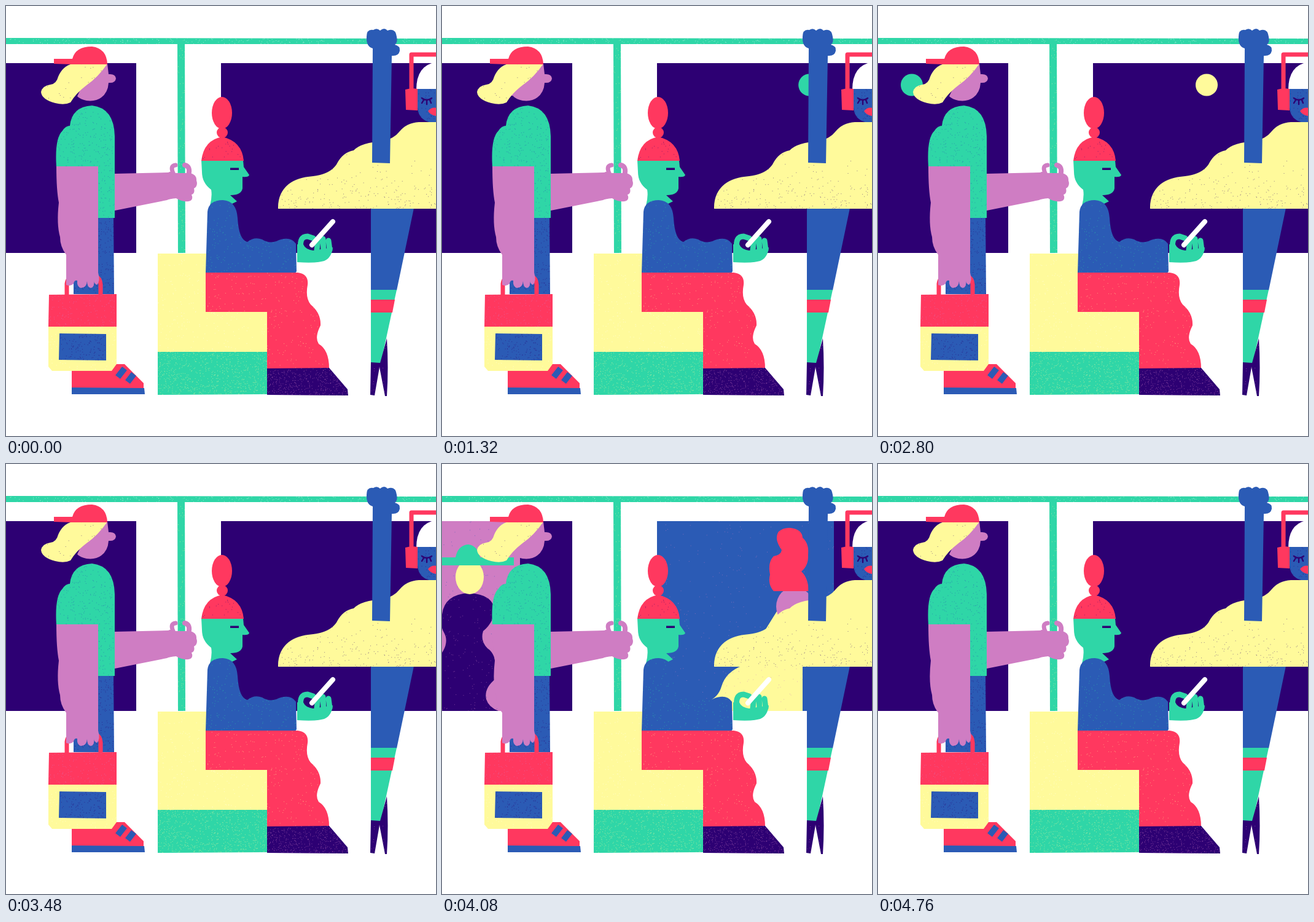
Animation of 700x700 px, one loop 4800 ms. Source, as an HTML page:

```html
<!DOCTYPE html>
<html lang="en">
<head>
<meta charset="utf-8">
<title>Subway ride</title>
<style>
html, body { margin: 0; width: 100%; height: 100%; overflow: hidden; background: #fff; }
svg { display: block; width: 100vw; height: 100vh; }
</style>
</head>
<body>
<svg id="stage" viewBox="0 0 700 700">
  <clipPath id="panes"><path d="M0 93H212V402H0ZM350 93H700V402H350Z"/></clipPath>
</svg>
<script>
const NS = 'http://www.w3.org/2000/svg';
const GREEN = '#2fd6a7', RED = '#ff385f', PINK = '#cf7dc3', YELLOW = '#fffa9b',
      BLUE = '#2b5bb5', NIGHT = '#2d0073', WHITE = '#fff';
const LOOP = 4800, STEP = 40;
const stage = document.getElementById('stage');

let seed = 11;
const rand = () => (seed = seed * 16807 % 2147483647) / 2147483647;

function el(tag, attrs, parent = stage) {
  const node = document.createElementNS(NS, tag);
  for (const key in attrs) node.setAttribute(key, attrs[key]);
  return parent.appendChild(node);
}
const group = (parent, attrs = {}) => el('g', attrs, parent);
const shape = (d, fill, parent) => el('path', { d, fill }, parent);
const line = (d, stroke, width, cap = 'round', parent) => el('path',
  { d, stroke, fill: 'none', 'stroke-width': width, 'stroke-linecap': cap, 'stroke-linejoin': 'round' }, parent);
const oval = (cx, cy, rx, ry, fill, parent) => el('ellipse', { cx, cy, rx, ry, fill }, parent);

// A flat shape with chalk specks; bias below 1 gathers them near the bottom.
let clips = 0;
function chalk(d, fill, speck, count, bias = 1, parent = stage) {
  const body = shape(d, fill, parent), box = body.getBBox(), id = 'clip' + clips++;
  shape(d, fill, el('clipPath', { id }, parent));
  let dots = '';
  for (let i = 0; i < count; i++) {
    const x = box.x + rand() * box.width, y = box.y + rand() ** bias * box.height;
    dots += `M${x.toFixed(1)} ${y.toFixed(1)}h1`;
  }
  el('path', { d: dots, stroke: speck, 'stroke-width': 1, opacity: 0.5, 'clip-path': `url(#${id})` }, parent);
}

// View through the panes
const view = group(stage, { 'clip-path': 'url(#panes)' });
shape('M0 93H700V402H0Z', NIGHT, view);
const lamps = Array.from({ length: 9 }, (_, i) =>
  oval(0, 128.5, 18, 18, [GREEN, YELLOW, PINK][i % 3], view));

// Riders are drawn in stage coordinates, moved by shift into their car.
const train = group(view);
function car(left, width, fill, speck, shift, riders) {
  const g = group(train, { transform: `translate(${left})` });
  chalk(`M0 93H${width}V402H0Z`, fill, speck, 350, 1, g);
  riders(group(g, { transform: `translate(${shift})` }));
}
car(0, 373, RED, PINK, 0, g => {
  chalk('M50 402Q44 260 80 232Q118 205 152 236Q188 270 180 402Z', BLUE, NIGHT, 200, 1, g);
  oval(115, 190, 28, 34, YELLOW, g);
  shape('M84 180Q84 130 116 130Q148 132 147 180Z', GREEN, g);
});
car(511, 373, PINK, BLUE, 246, g => {
  chalk('M-14 402Q0 380 -4 345Q-8 318 2 304Q11 288 3 274Q-4 262 0 245Q4 212 44 210Q84 212 86 240Q82 260 67 272Q62 288 74 300Q92 312 87 350Q68 365 72 383Q76 396 92 402Z',
    NIGHT, PINK, 160, 1, g);
  oval(45, 184, 23, 28, YELLOW, g);
  shape('M-32 152H22Q26 132 43 131Q58 133 62 152H117V165H-32Z', GREEN, g);
});
car(1022, 373, BLUE, PINK, -265, g => {
  chalk('M432 387Q450 380 455 362Q462 338 490 328L545 240H587V402H430Z', YELLOW, PINK, 120, 1, g);
  oval(574, 232, 30, 32, PINK, g);
  shape('M548 110Q556 103 567 104Q586 106 587 120Q598 130 596 148Q597 165 585 175Q596 185 597 207H540Q530 196 534 180Q530 160 540 150Q552 148 553 140Q540 122 548 110Z', RED, g);
});
car(1547, 373, GREEN, YELLOW, 210, g => {
  chalk('M-14 402V280Q-6 238 24 218Q50 208 82 222Q112 240 112 402Z', RED, BLUE, 220, 1, g);
  oval(52, 188, 29, 34, PINK, g);
  shape('M2 138Q6 113 44 113Q78 116 86 136Q90 150 76 158Q48 164 26 160Q2 156 2 138Z', NIGHT, g);
});
car(2058, 399, YELLOW, WHITE, -301, g => {
  chalk('M387 402V290Q388 262 396 248Q386 230 392 220H438Q445 235 441 255Q446 286 462 302Q488 318 488 350Q512 366 524 372Q537 385 530 402Z',
    PINK, YELLOW, 350, 1, g);
  oval(412.5, 187, 34, 36, BLUE, g);
  shape('M620 205H640V217H620Z', PINK, g);
  shape('M620 140Q640 122 648 142Q662 160 655 178Q664 194 645 206L620 210Z', GREEN, g);
  chalk('M585 300L533 402H666L660 300Z', RED, PINK, 200, 1, g);
});

// Carriage
chalk('M0 52L700 53V62H0Z', GREEN, WHITE, 220);
chalk('M279 56H291L292 402H280Z', GREEN, YELLOW, 90);
chalk('M247 403H425V563H247Z', YELLOW, WHITE, 300);
chalk('M247 563H425V632L247 633Z', GREEN, YELLOW, 700);

// Standing rider
chalk('M150 344H175L176 469H110V438H150Z', BLUE, NIGHT, 260);
shape('M177 273L264 271Q270 268 274 272H300Q311 275 310 284Q313 293 306 297Q308 305 302 307Q306 316 297 318Q286 319 277 313Q266 314 262 316L177 333Z', PINK);
line('M273 274Q266 260 276 259', PINK, 7);
line('M291 259Q301 261 297 276', PINK, 8);
chalk('M104 195Q107 164 140 162Q176 166 177 212V345H149V262H82Q79 215 92 203Q97 195 104 195Z', GREEN, BLUE, 420);
shape('M165 94L167 111Q178 110 179 118Q178 126 167 125Q166 141 155 149Q146 156 131 154Q121 152 116 147L140 95Z', PINK);
chalk('M108 94H165Q150 116 131 129Q114 142 105 157Q95 162 80 158Q58 152 57 140Q59 130 72 128Q82 127 85 115Q92 98 108 94Z', YELLOW, NIGHT, 30);
shape('M78 86H108Q113 66 140 66Q164 69 165 95H108L78 94Z', RED);
line('M99 470V452Q101 440 112 440', RED, 7);
line('M154 470V453Q153 443 146 440', RED, 7);
line('M114 441H148', RED, 6);
shape('M82 261H150V434Q154 448 148 454Q143 452 143 446Q145 458 138 459Q132 458 132 448Q131 459 122 459Q115 457 116 447Q111 446 110 452Q105 457 98 454V405Q88 392 88 376Q82 355 86 320Q82 300 82 261Z', PINK);
chalk('M70 470L180 469V522H69Z', RED, PINK, 140);
chalk('M69 522H180V592L172 594H75L69 587Z', YELLOW, WHITE, 100);
chalk('M87 533L163 534V577L86 576Z', BLUE, NIGHT, 140);
shape('M107 594H172L180 583H193L224 614V622H107Z', RED);
line('M182 604L193 590M198 612L208 599', BLUE, 10, 'butt');
shape('M107 621L225 622L226 632H107Z', BLUE);

// Seated rider
shape('M318 251H386L387 262L396 275Q395 279 385 278V297Q383 308 365 308L376 318L362 325H332Q336 310 334 299Q319 288 319 270Z', GREEN);
shape('M365 263.5H379V267H365Z', NIGHT);
oval(351.5, 174, 16.5, 26, RED);
oval(352, 206, 9, 9, RED);
chalk('M318 252Q322 218 352 213Q384 220 387 252Z', RED, NIGHT, 25);
chalk('M325 435L328 335Q330 316 353 316Q375 317 377 345Q379 381 393 384Q404 375 417 380Q428 387 440 383Q462 373 472 387L473 432L470 436Z', BLUE, GREEN, 200, 0.7);
chalk('M325 434H475Q493 436 491 454Q487 475 496 486Q513 500 512 520Q502 540 509 550Q526 560 526 590H425V498H325Z', RED, YELLOW, 300);
chalk('M425 590L526 589L556 624L557 634L425 633Z', NIGHT, PINK, 420);
shape('M474 388H484Q487 396 500 398L532 393Q530 410 518 415Q505 419 474 417Z', GREEN);
line('M480 395Q477 375 491 375L500 378', GREEN, 9);
line('M508 381L506 397M516 379L517 399M525 382L527 397', GREEN, 9);
line('M498 389L532 351', WHITE, 8);

// Rider with headphones
shape('M594 329H664L636 463H594Z', BLUE);
shape('M594 462H636L610 582H594Z', GREEN);
shape('M594 478H633L629 499H594Z', RED);
chalk('M594 580L609 581L620 541Q623 590 620 635H617L608 588L600 634L593 633Z', NIGHT, PINK, 30);
line('M660 137V79H701', RED, 7, 'butt');
shape('M668 136Q668 96 701 91V136Z', WHITE);
chalk('M670 135H701V189H689Q671 184 670 165Z', BLUE, NIGHT, 40);
line('M677 150Q685 156 693 150M680 153L677 158M685 154V160M690 153L692 158', NIGHT, 2.4);
shape('M687 171Q693 164 701 166V179Q691 178 687 171Z', RED);
shape('M650 136Q660 133 670 135V170L651 169Z', RED);
chalk('M443 330Q442 305 460 290Q474 279 500 277Q527 274 538 258Q548 238 566 235Q578 222 615 220Q632 215 640 205Q652 190 672 189H701V330Z', YELLOW, NIGHT, 200, 0.2);
shape('M597 69Q586 66 587 50Q587 37 598 39Q604 35 609 40Q616 34 621 40Q634 35 636 50Q638 60 633 63Q642 65 641 73Q639 82 628 81L625 256L596 255Z', BLUE);

function draw(ms) {
  const step = Math.floor(ms % LOOP / STEP);
  lamps.forEach((lamp, i) => lamp.setAttribute('cx', 659 + 480 * i - 53.6 * (step - 5)));
  train.setAttribute('transform', `translate(${-757 - 100 * (step - 102)})`);
}

const start = performance.now();
function tick() {
  draw(performance.now() - start);
  requestAnimationFrame(tick);
}
tick();
</script>
</body>
</html>
```
